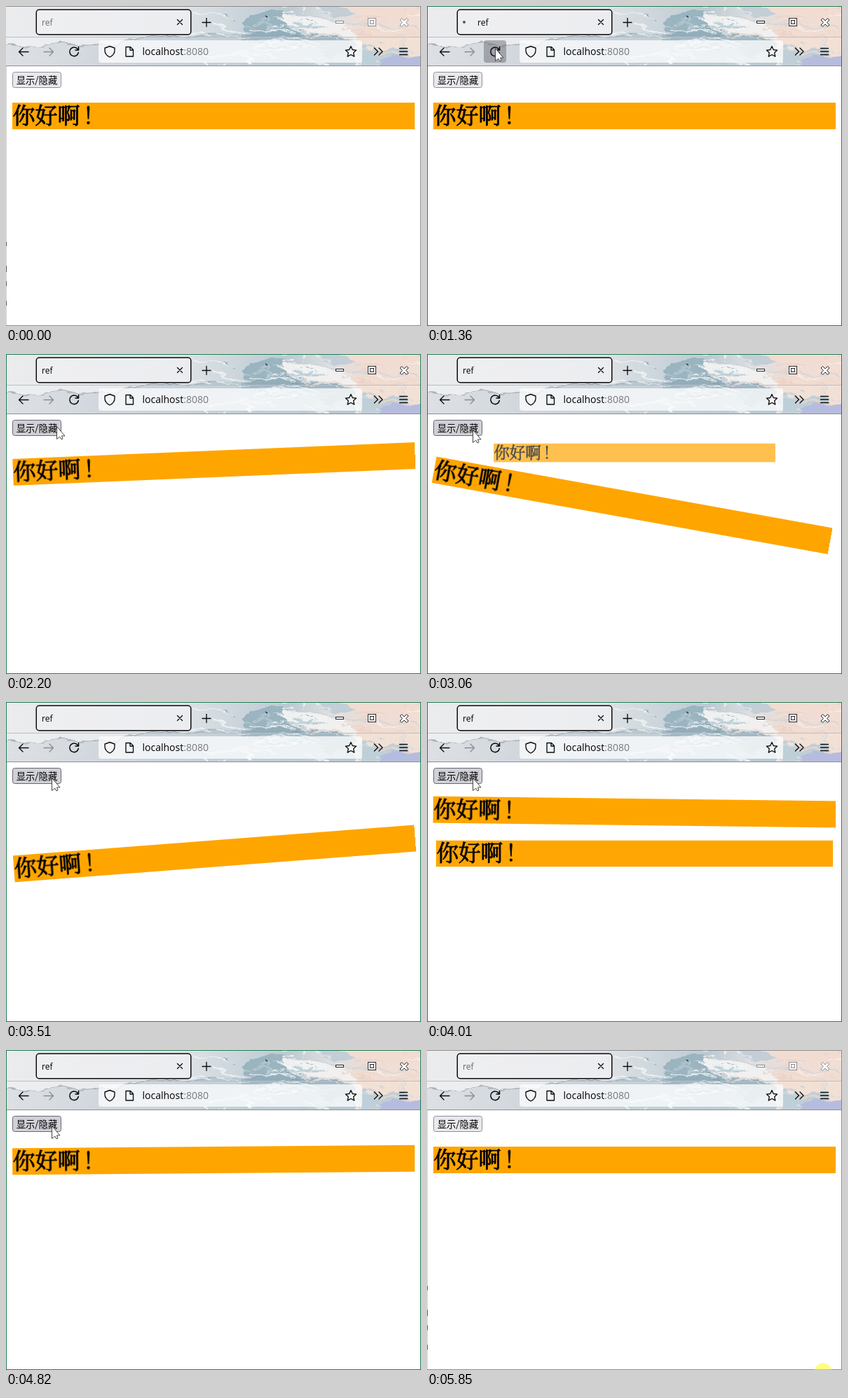
These frames come from a looping animation (592 by 457 pixels, 5.92 s). An HTML page:

```html
<!DOCTYPE html>
<html lang="zh">
<head>
<meta charset="utf-8">
<title>ref</title>
<style>
html, body { margin: 0; width: 100%; height: 100%; overflow: hidden; background: #fff; }
svg { display: block; }
.ui { font-family: "Open Sans", "Noto Sans", sans-serif; }
.cjk { font: 13.33px "Noto Sans CJK SC", "Noto Sans CJK", sans-serif; }
.title { font: 32px "Noto Serif CJK SC", "Noto Sans CJK SC", "Noto Sans CJK", serif; stroke: #000; stroke-width: .9; }
.line { fill: none; stroke: #0c0c0d; stroke-width: 1.35; stroke-linecap: round; stroke-linejoin: round; }
.hide { opacity: 0; }
</style>
</head>
<body>
<svg width="592" height="457" viewBox="0 0 592 457">
  <defs>
    <linearGradient id="sky">
      <stop offset="0" stop-color="#ebecee"/>
      <stop offset=".42" stop-color="#e0e3e7"/>
      <stop offset=".56" stop-color="#cbd5db"/>
      <stop offset=".68" stop-color="#bccad2"/>
      <stop offset=".78" stop-color="#dedfe0"/>
      <stop offset=".88" stop-color="#eedcd4"/>
      <stop offset="1" stop-color="#f1ded5"/>
    </linearGradient>
    <linearGradient id="mist">
      <stop offset="0" stop-color="#d9dce1"/>
      <stop offset=".4" stop-color="#c3ccd3"/>
      <stop offset="1" stop-color="#a9c0cb"/>
    </linearGradient>
    <filter id="paint" x="-5%" y="-15%" width="110%" height="130%" color-interpolation-filters="sRGB">
      <feTurbulence type="fractalNoise" baseFrequency=".022 .05" numOctaves="4" seed="8"/>
      <feDisplacementMap in="SourceGraphic" scale="30" xChannelSelector="R" yChannelSelector="G"/>
    </filter>
    <clipPath id="top"><rect width="592" height="86"/></clipPath>
    <clipPath id="view"><rect x="1" y="86" width="590" height="370"/></clipPath>
    <g id="bar">
      <rect x="-287" width="574" height="38" fill="#ffa500"/>
      <text class="title" x="-286.500" y="30">你好啊<tspan dx="4">！</tspan></text>
    </g>
    <g id="controls" fill="#fff" stroke-width="1">
      <rect x="470.5" y="21.5" width="11" height="3"/>
      <rect x="516.5" y="17.5" width="11" height="11"/>
      <rect x="519.5" y="20.5" width="5" height="5"/>
      <path d="M564.5 17.5l3.500 3.500 3.500-3.500 2.500 2.500-3.500 3.500 3.500 3.500-2.500 2.500-3.500-3.500-3.500 3.500-2.500-2.500 3.500-3.500-3.500-3.500z"/>
    </g>
  </defs>

  <rect width="592" height="457" fill="#fff"/>

  <g clip-path="url(#top)">
    <rect width="592" height="86" fill="url(#sky)"/>
    <g filter="url(#paint)">
      <path d="M-20 53Q40 61 90 55T190 46T330 42L500 56V110H-20z" fill="url(#mist)"/>
      <path d="M345 10Q375 4 415 14Q412 34 370 36T345 26z" fill="#9ab4c0"/>
      <path d="M335 42Q380 28 430 38T500 56L470 72Q400 50 335 56z" fill="#93adba"/>
      <path d="M395 14Q430 4 465 22T530 44Q480 48 450 38T395 30z" fill="#f1f0f0"/>
      <path d="M425 -10Q445 10 480 8T540 -10z" fill="#c3ced6"/>
      <path d="M470 -18Q490 16 540 12T620 30V-18z" fill="#f2dcd2"/>
      <path d="M495 40Q530 28 620 46V72Q560 60 495 70z" fill="#f0dace"/>
      <path d="M505 54Q530 66 560 60T570 76Q550 78 505 88z" fill="#b4c6d0"/>
      <path d="M540 76Q565 66 620 68V110H530z" fill="#a9b0d8"/>
      <path d="M-10 54Q40 62 90 56T190 47T330 45" fill="none" stroke="#9aa3ac" stroke-width="1.300"/>
      <g id="streaks" fill="none" stroke-linecap="round"></g>
    </g>
    <path d="M370 14l3 2" stroke="#223" stroke-width="1.500"/>
    <rect y="44" width="592" height="42" fill="#fff" opacity=".15"/>
    <path d="M0 44.500H592" stroke="#b9bfc6"/>
    <path d="M0 85.500H592" stroke="#8e9098"/>
  </g>

  <rect x="43.250" y="5.250" width="220.500" height="35.500" rx="4" fill="#f1f1f4" fill-opacity=".72" stroke="#0c0c0d" stroke-width="1.500"/>
  <path class="line" d="M244.500 19.500l7 7m0-7l-7 7M280 23.500h12m-6-6v12"/>

  <rect id="hover" class="hide" x="81" y="49" width="32" height="32" rx="4" fill="#6b6b73" fill-opacity=".5"/>
  <rect x="132" y="49" width="376" height="32" rx="4" fill="#fbfcfd" fill-opacity=".8"/>
  <g class="line">
    <path d="M32 65.500H18.500m5.500-5.500l-5.500 5.500 5.500 5.500"/>
    <path d="M54 65.500H67.500m-5.500-5.500l5.500 5.500-5.500 5.500" stroke="#8b8d94"/>
    <path d="M102.500 62A6.300 6.300 0 1 0 103.300 66.500M103.500 58.500V63H99" stroke-width="1.600"/>
    <path d="M148 57.500l7 2.500v3.500q0 6-7 9.500-7-3.500-7-9.500V60z"/>
    <path d="M171 58.500h6.500l4 4v9.500h-10.500zM177 58.500v4.500h4.500"/>
    <path d="M492 57.500l2.300 5 5.400.6-4 3.700 1.100 5.400-4.800-2.700-4.800 2.700 1.100-5.400-4-3.700 5.400-.6z"/>
    <path d="M525.500 60l5 5-5 5m6.500-10l5 5-5 5"/>
    <path d="M561.500 60.500h11m-11 4.500h11m-11 4.500h11"/>
  </g>
  <text class="ui" x="194.500" y="70" font-size="14">localhost<tspan fill="#77777d">:8080</tspan></text>

  <g clip-path="url(#view)">
    <rect id="face" x="9.500" y="94.500" width="69" height="22" rx="3" fill="#e9e9ed" stroke="#8f8f9d"/>
    <text class="cjk" x="14.700" y="111">显示/隐藏</text>
    <g id="first"><use href="#bar"/></g>
    <g id="second"><use href="#bar"/></g>
  </g>

  <g id="idle">
    <text class="ui" x="51" y="28" font-size="12" fill="#6a6a70">ref</text>
    <use href="#controls" stroke="#8c8c90"/>
    <path d="M0 .5H591.500V456.500H0" fill="none" stroke="#8a8a8a"/>
    <path d="M.5 86V456" stroke="#d4d4d4"/>
    <path d="M.5 337v6m0 28v9m0 13v7m0 21v7" stroke="#6b5148"/>
  </g>
  <g id="active" class="hide">
    <use href="#controls" stroke="#26262a"/>
    <rect x=".5" y=".5" width="591" height="456" fill="none" stroke="#217a50"/>
  </g>
  <text id="loaded" class="ui hide" x="51" y="28" font-size="12">ref</text>
  <g id="loading" class="hide">
    <circle id="dot" cx="53" cy="23" r="2" fill="#55555a"/>
    <text class="ui" x="72" y="28" font-size="12">ref</text>
  </g>

  <g id="cursor">
    <circle id="click" class="hide" r="12" fill="#ff0" fill-opacity=".5"/>
    <g id="busy" class="hide" fill="none" stroke-width="3.500">
      <circle cx="18" cy="0" r="6" stroke="#d3dccb"/>
      <path d="M18 -6A6 6 0 0 1 22 4.500" stroke="#dccf6a"/>
    </g>
    <path d="M.5 .5V18.500L4.800 15.200 7 19 9 18 7.500 14H12z" fill="#fff" stroke="#4a423c" stroke-linejoin="round"/>
  </g>
</svg>
<script>
const LOOP = 5920, MOVE = 885;
const LOAD = 1439, SWAP = 2857, BACK = 4000;
const TOP = 138, LOW = 197.5;
const $ = id => document.getElementById(id);

// Brush strokes of the window theme.
let seed = 11;
const rnd = () => (seed = seed * 16807 % 2147483647) / 2147483647;
const cool = ['#7f9dac', '#f2f5f6', '#b3c8d1', '#dfe7ea'];
const warm = ['#f8efea', '#ecd0c3', '#c9d3da', '#f3e0d7'];
$('streaks').innerHTML = Array.from({ length: 80 }, () => {
  const x = 265 + rnd() * 310, y = rnd() * 90, w = 20 + rnd() * 40;
  const hues = x < 430 ? cool : warm;
  return `<path d="M${x} ${y}q${w / 2} ${rnd() * 16 - 8} ${w} ${rnd() * 10}"
    stroke="${hues[rnd() * 4 | 0]}" stroke-width="${.8 + rnd() * 2.4}" opacity=".8"/>`;
}).join('');

// Each step: [time, properties, easing to the next step]; steps hold by default.
function run(id, steps) {
  const all = [...steps, [LOOP, steps[steps.length - 1][1]]];
  $(id).animate(
    all.map(([t, props, easing = 'step-end']) => ({ ...props, offset: t / LOOP, easing })),
    { duration: LOOP, iterations: Infinity });
}

function shown(id, ...spans) {
  const start = spans[0][0] > 0 ? [[0, { opacity: 0 }]] : [];
  run(id, [...start, ...spans.flatMap(([a, b]) => [
    [a, { opacity: 1 }],
    ...(b < LOOP ? [[b, { opacity: 0 }]] : [])
  ])]);
}

const pose = (y, { turn = 0, size = 1, pivot = 0, opacity = 1 } = {}) => ({
  transform: `translate(296px, ${y + pivot}px) rotate(${turn}deg) scale(${size}) translate(0px, ${-pivot}px)`,
  opacity
});

const swing = (t, y) => [0, 15, -10, 5, -5, 0].map((turn, i) =>
  [t + MOVE * i / 5, pose(y, { turn }), i < 5 ? 'ease' : 'step-end']);

const backOutUp = (t, y) => {
  const small = { size: .7, pivot: 19, opacity: .7 };
  return [
    [t, pose(y, { pivot: 19 }), 'ease'],
    [t + MOVE * .2, pose(y, small), 'ease'],
    [t + MOVE, pose(y - 700, small)],
    [t + MOVE, pose(y, { opacity: 0 })]
  ];
};

run('first', [
  [0, pose(TOP)],
  ...swing(LOAD, TOP),
  ...backOutUp(SWAP, TOP),
  ...swing(BACK, TOP)
]);
run('second', [
  [0, pose(LOW, { opacity: 0 })],
  ...swing(SWAP, LOW),
  [SWAP + MOVE, pose(TOP)],
  ...backOutUp(BACK, LOW)
]);

const at = (x, y) => ({ transform: `translate(${x}px, ${y}px)` });
run('cursor', [
  [0, at(-40, 62)],
  [690, at(-12, 60), 'ease-out'],
  [930, at(97, 60)],
  [1430, at(97, 60), 'ease-in-out'],
  [1750, at(72, 103)],
  [2230, at(72, 103), 'ease-in-out'],
  [2350, at(65, 108)],
  [4890, at(65, 108), 'ease-in-out'],
  [5060, at(97, 61)],
  [5130, at(97, 61), 'ease-in-out'],
  [5560, at(565, 459)]
]);
run('dot', [
  [0, at(0, 0)],
  [1360, at(0, 0), 'ease-in-out'],
  [1570, at(12, 0), 'ease-in-out'],
  [1790, at(0, 0)]
]);

const plain = { fill: '#e9e9ed', stroke: '#8f8f9d' };
const over = { fill: '#d0d0d7', stroke: '#676774' };
const down = { fill: '#b1b1b9', stroke: '#484851' };
run('face', [
  [0, plain], [1690, over],
  [2750, down], [2840, over],
  [3920, down], [3990, over],
  [4930, plain]
]);

shown('hover', [890, 1530], [5010, 5190]);
shown('click', [1160, 1250], [2750, 2840], [3920, 3990], [5820, LOOP]);
shown('busy', [4190, 4460]);
shown('idle', [0, 1160], [5850, LOOP]);
shown('active', [1160, 5850]);
shown('loading', [1160, 1790]);
shown('loaded', [1790, 5850]);
</script>
</body>
</html>
```
